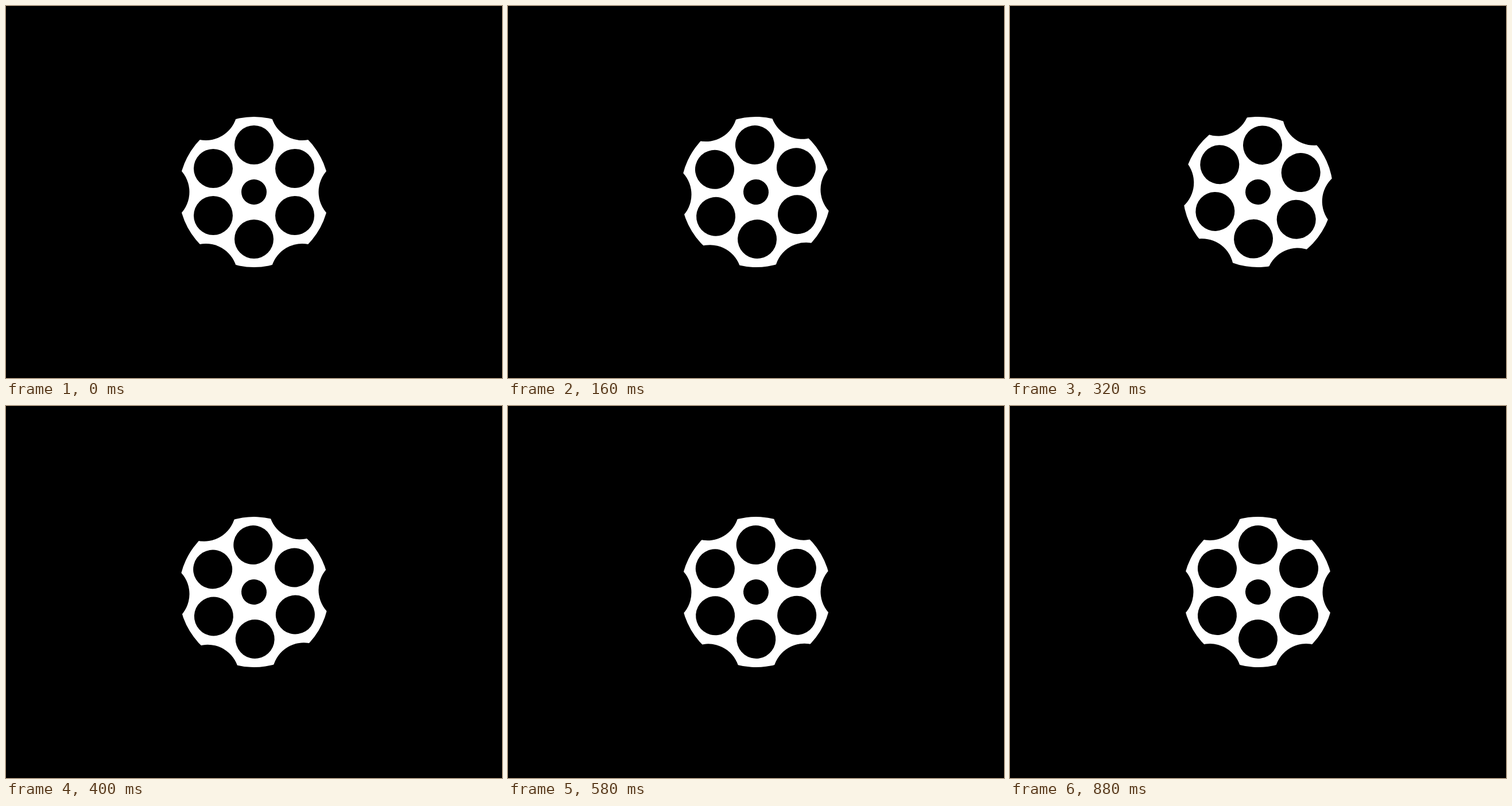
An HTML page for the animation above (0.98 s loop, 864 px wide and 648 px high).

```html
<!DOCTYPE html>
<html lang="en">
<head>
<meta charset="utf-8">
<title>Spinning cylinder</title>
<style>
  html, body { margin: 0; width: 100%; height: 100%; overflow: hidden; background: #000; }
  svg { display: block; width: 864px; height: 648px; }
</style>
</head>
<body>
<svg viewBox="-432 -324 864 648">
  <g id="wheel">
    <circle r="131" fill="#fff"/>
    <circle r="22"/>
  </g>
</svg>
<script>
  const LOOP = 980, STEP = 20, FIRST = 40, LAST = 880;
  const START = 24, TURN = 60, DECAY = 0.0075, FREQ = 0.0146;
  const wheel = document.getElementById('wheel');

  function addCircle(deg, dist, r) {
    const c = document.createElementNS('http://www.w3.org/2000/svg', 'circle');
    const a = deg * Math.PI / 180;
    c.setAttribute('cx', dist * Math.sin(a));
    c.setAttribute('cy', -dist * Math.cos(a));
    c.setAttribute('r', r);
    wheel.append(c);
  }

  for (let deg = 0; deg < 360; deg += 60) {
    addCircle(deg, 82, 34);          // chamber
    addCircle(deg + 30, 167.5, 55);  // notch in the rim
  }

  // Underdamped spring over one sixth of a turn
  function angle(ms) {
    if (ms < FIRST) return 0;
    if (ms >= LAST) return TURN;
    const t = ms - START, p = FREQ * t;
    const rest = Math.exp(-DECAY * t) * (Math.cos(p) + DECAY / FREQ * Math.sin(p));
    return TURN * (1 - rest);
  }

  function draw() {
    const ms = performance.now() % LOOP;
    const held = Math.floor(ms / STEP) * STEP;
    wheel.setAttribute('transform', `rotate(${angle(held)})`);
    requestAnimationFrame(draw);
  }
  draw();
</script>
</body>
</html>
```
